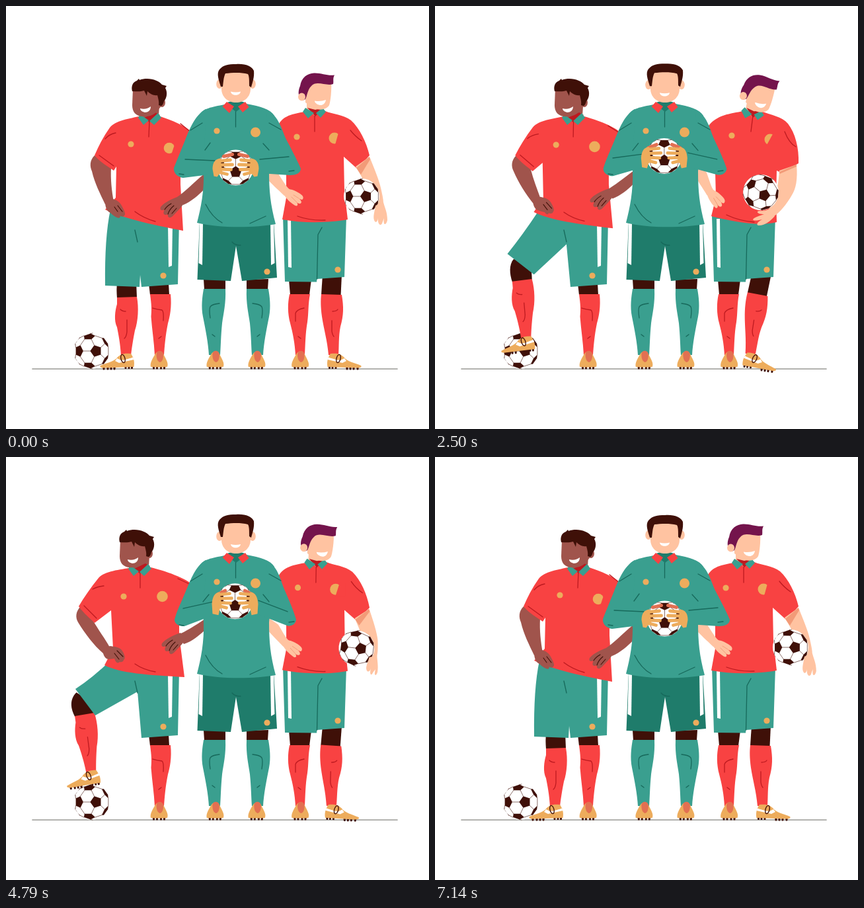
Write an HTML page with a canvas that moves like this. It is 640 by 640 pixels and loops after 7.21 s.

```html
<!DOCTYPE html>
<html lang="en">
<head>
<meta charset="utf-8">
<title>Three football players</title>
<style>
html, body { margin: 0; width: 100%; height: 100%; overflow: hidden; background: #fff; }
canvas { display: block; width: 640px; height: 640px; }
</style>
</head>
<body>
<canvas id="stage" width="640" height="640"></canvas>
<script>
const ctx = document.getElementById('stage').getContext('2d');
const PERIOD = 3605;
const RED = '#f84242', WINE = '#bd1a20', TEAL = '#3a9f8f', PINE = '#1f7c6b', MOSS = '#17695b';
const DARK = '#3f1008', GOLD = '#edac5c', CORAL = '#e27052', WHITE = '#fff';
const SKIN = '#ffc3a1', SHADE = '#f29b78', BROWN = '#a0544c', PLUM = '#74144c';

// drawing helpers
const mix = (a, b, u) => {
  const to = b.match(/-?[\d.]+/g);
  let i = 0;
  return a.replace(/-?[\d.]+/g, v => (+v + (to[i++] - v) * u).toFixed(2));
};
const fill = (d, color) => { ctx.fillStyle = color; ctx.fill(new Path2D(d)); };
const line = (d, color, w = 1.3) => {
  ctx.strokeStyle = color;
  ctx.lineWidth = w;
  ctx.stroke(new Path2D(d));
};
const oval = (x, y, rx, ry, color) => {
  ctx.fillStyle = color;
  ctx.beginPath();
  ctx.ellipse(x, y, rx, ry, 0, 0, 7);
  ctx.fill();
};
const dot = (x, y, r, color) => oval(x, y, r, r, color);
const group = (x, y, turn, draw) => {
  ctx.save();
  ctx.translate(x, y);
  ctx.rotate(turn);
  draw();
  ctx.restore();
};
const flip = (axis, draw) => {
  ctx.save();
  ctx.translate(axis * 2, 0);
  ctx.scale(-1, 1);
  draw();
  ctx.restore();
};
const both = (axis, draw) => { draw(); flip(axis, draw); };

// motion helpers
const ramp = (p, a, b) => {
  const x = Math.min(1, Math.max(0, (p - a) / (b - a)));
  return x * x * x * (10 - 15 * x + 6 * x * x);
};
const KNOTS = [0, 0.2, 0.5, 1];
const curve = (u, ...v) => v.reduce((sum, y, i) =>
  sum + KNOTS.reduce((m, k, j) => j === i ? m : m * (u - k) / (KNOTS[i] - k), y), 0);

// football: projected truncated icosahedron, front pentagon tilted to the right
const tips = [[0, 0, 1], [0, 0, -1]];
for (let i = 0; i < 5; i++) {
  for (const s of [1, -1]) {
    const a = Math.PI + i * Math.PI * 0.4 + (s < 0 ? Math.PI / 5 : 0), r = 2 / Math.sqrt(5);
    tips.push([r * Math.cos(a), r * Math.sin(a), s / Math.sqrt(5)]);
  }
}
const tilt = 0.27;
const hub = tips.map(([x, y, z]) => [
  x * Math.cos(tilt) + z * Math.sin(tilt), y, z * Math.cos(tilt) - x * Math.sin(tilt)]);
const along = (a, b, k) => {
  const v = a.map((c, i) => c + (b[i] - c) * k), n = Math.hypot(...v);
  return v.map(c => c / n);
};
const less = (a, b) => a.map((c, i) => c - b[i]);
const dotp = (p, q) => p[0] * q[0] + p[1] * q[1] + p[2] * q[2];
const cross = (p, q) => [p[1] * q[2] - p[2] * q[1], p[2] * q[0] - p[0] * q[2], p[0] * q[1] - p[1] * q[0]];
const near = v => hub.filter(w => w !== v && Math.hypot(...less(w, v)) < 1.2);
const patches = hub.filter(v => v[2] > -0.3).map(v => {
  const far = near(v);
  const side = cross(v, far[0]), ahead = cross(side, v);
  const angle = w => Math.atan2(dotp(w, side), dotp(w, ahead));
  return far.sort((p, q) => angle(p) - angle(q)).map(w => along(v, w, 1 / 3));
});
const seams = [];
hub.forEach((v, i) => near(v).forEach(w => {
  if (hub.indexOf(w) > i) seams.push([along(v, w, 1 / 3), along(v, w, 2 / 3)]);
}));
const onRim = ([x, y, z], r) => {
  const k = z < 0 ? r / Math.hypot(x, y) : r;
  return (x * k).toFixed(2) + ' ' + (y * k).toFixed(2);
};
const ball = (x, y, turn) => group(x, y, turn, () => {
  const r = 27;
  dot(0, 0, r, WHITE);
  for (const p of patches) {
    if (p.some(c => c[2] > 0.03)) fill('M' + p.map(c => onRim(c, r)).join('L') + 'Z', DARK);
  }
  for (const [a, b] of seams) {
    if (a[2] > 0 || b[2] > 0) line(`M${onRim(a, r)}L${onRim(b, r)}`, DARK, 0.6);
  }
});

// shared parts
const studs = (xs, y) => xs.forEach(x => fill(`M${x - 1.8} ${y}h3.6l-.6 4h-2.4Z`, DARK));
const frontShoe = x => group(x, 0, 0, () => {
  studs([-8, -3, 3, 8], 545.5);
  fill('M-6 527C-10 534 -14 540 -12.500 546Q0 547 12.500 546C15 540 10 534 7 527C4 521 -3 521 -6 527Z', GOLD);
  fill('M-4 527C-4 520 6 520 6.500 527C7 535 4 539 1 539C-3 537 -4 532 -4 527Z', CORAL);
});
const sideShoe = () => {
  studs([148, 154, 159, 164], 546.5);
  studs([181, 186, 190.5], 545);
  fill('M173 528C178 525 186 526 189 526C193 532 195 538 193.500 546L150 547.500C144 548 141 546 143 544C152 540 164 538 169 531Z', GOLD);
  fill('M165 537L171 540L193.500 535L192 531.500L174 536L168 533Z', WHITE);
  fill('M178 531L190 529L191 532L177 536Z', GOLD);
  ctx.beginPath();
  ctx.ellipse(177, 533.5, 3, 6.3, -0.25, 0, 7);
  ctx.strokeStyle = DARK;
  ctx.lineWidth = 1.3;
  ctx.stroke();
};
const mark = (x, y) => dot(x, y, 4.6, GOLD);

function leftPlayer(u) {
  const key = (...v) => curve(u, ...v);
  const m = (a, b) => mix(a, b, u);

  // standing leg
  fill('M216 420L246 420L247 437L218 437Z', DARK);
  fill('M218 436L249 436C251 455 248 470 245 480C241 500 240 515 239 528L225 528C224 508 221 490 219.500 470C221 455 219 445 218 436Z', RED);
  line('M222 457Q229 459 236 460Q239 462 238 476M231 503L235 500', WINE);
  frontShoe(231.5);

  // moving leg
  group(key(183, 162, 134, 119), key(441, 440, 418, 390), key(0, -0.02, -0.08, -0.13), () => {
    fill(m('M-15 1C-16 -12 -16 -24 -12 -32L14 -24L15 0Z', 'M-15 1C-20 -12 -20 -26 -8 -35L17 -14L15 0Z'), DARK);
    fill('M-15 0L15 -1C18 15 17 35 12 50C9 65 7 78 6 88L-9 88C-10 70 -13 55 -15 45C-20 35 -18 20 -15 10Z', RED);
    line('M-10 18Q-7 21 -2 21M0 34L0 52Q-1 60 -4 62', WINE);
    ctx.translate(-183, -441);
    sideShoe();
  });

  // shorts
  const hip = `${key(149, 146, 133, 131)} ${key(350, 350, 348, 334)}`;
  const outer = `${key(150, 132, 111, 105)} ${key(423, 410, 378, 351)}`;
  const inner = `${key(202, 181, 152, 135)} ${key(425, 423, 408, 391)}`;
  const fork = `${key(203, 201, 199, 199)} ${key(407, 378, 361, 355)}`;
  fill(`M158 308Q${hip} ${outer}L${inner}L${fork}L205 425L260 421L262 322Z`, TEAL);
  fill('M245 330L252 330L251 393L246 395Z', WHITE);
  line('M195 339L199 357', MOSS);
  mark(238, 408);

  // far arm, shirt
  fill(m('M134 226C126 234 127 243 130 250C134 268 143 285 150 300L163 296C160 280 158 262 159 245Z',
    'M113 226C105 234 105 243 109 250C120 268 133 285 147 297L157 288C150 275 140 262 132 248Z'), BROWN);
  fill(m('M205 166C185 171 166 173 157 184C147 198 140 212 134 226C143 237 155 243 163 249L167 243L166 290L150 308C175 320 215 330 268 340L264 270L264 240L285 195C272 180 250 173 233 167Z',
    'M190 167C172 171 150 172 140 183C128 198 118 212 110 226C118 237 127 244 134 251L159 232L162 290L149 315C172 327 215 330 270 333L262 270L262 240L285 195C272 183 240 172 219 167Z'), RED);
  line(m('M150 201Q156 194 166 192M141 226L163 242M264 178L280 191M217 174L216 198M195 311Q208 321 226 326',
    'M131 200Q138 196 148 195M118 225L137 244M260 184L277 192M203 173L203 198M195 313Q208 322 226 325'), WINE);
  mark(189 - 11 * u, 209 + 2 * u);
  dot(247 - 10.5 * u, 215 - 4 * u, 8.3, GOLD);
  fill(m('M256 207L250 225L262 225L262 207Z', 'M250 207L250 225L262 225L262 207Z'), RED);

  // hands
  fill(m('M150 296C150 305 153 311 158 313C161 316 165 319 168 320C172 322 174 319 172 317C175 319 178 319 179 317C182 315 178 308 175 302C172 296 166 293 162 292Z',
    'M146 292C147 300 150 306 156 306C159 306 162 305 164 305C166 311 169 313 172 310C175 311 178 309 178 307C182 304 178 296 175 292C170 287 164 287 157 286Z'), BROWN);
  line(m('M164 304L169 311M169 302L176 311', 'M164 297L171 306M168 293L177 302'), DARK, 1.1);
  fill(m('M300 254C285 266 272 280 259 289L268 301C280 296 292 286 300 277Z',
    'M301 245C285 256 272 264 260 269L269 283C282 279 292 270 301 262Z'), BROWN);
  group(2 * u, -22 * u, 0, () => {
    fill('M262 288C250 292 240 297 234 304C232 309 236 310 240 308C237 313 238 318 245 315C244 320 248 322 252 318C258 312 266 304 270 297Z', BROWN);
    line('M250 299Q243 303 240 308M254 302Q247 308 245 315M258 306L251 314', DARK, 1.1);
  });

  // neck, collar and head
  group(-15 * u, 0, 0, () => {
    fill('M209 156L232 150L231 166L217 175L208 168Z', BROWN);
    fill('M209 169L226 161L233 165L217 176Z', WINE);
    fill('M203 164L200 169L208 180L216 173ZM217 174L224 180L235 169L230 162Z', TEAL);
  });
  group(-19 * u, 0, 0, () => {
    fill('M192 125L191 150C191 160 196 166 205 167C215 168 222 166 228 160L236 150L234 124Z', BROWN);
    oval(236, 146, 5, 7, BROWN);
    fill('M191 129C189 121 192 115 198 113L201 110L202 112C215 107 231 112 236 119L243 121L241 124C245 131 243 140 239 144C238 148 236 152 234 151L231 150C232 145 230 139 229 135C224 136 218 133 214 129L213 136L209 128C203 130 196 129 191 129Z', DARK);
    fill('M203 155C209 157 215 155 219 152C219 158 215 161 210 161C206 160 203 158 203 155Z', WHITE);
  });
}

function keeper(u) {
  const m = (a, b) => mix(a, b, u);

  // legs
  both(348, () => {
    fill('M299 413L332 414L332 429L300 429Z', DARK);
    fill('M299 428L332 428C333 450 329 465 327 480C325 500 325 515 324 528L307 528C306 510 302 490 298 470C295 455 297 440 299 428Z', TEAL);
    line('M309 472Q307 459 309 455Q312 451 323 450M312 497L316 500', MOSS);
  });
  frontShoe(316.3);
  frontShoe(379.3);
  fill('M293 325L289.500 414L340 416L348 363L357 416L410 411L405 325Z', PINE);
  both(349, () => fill('M293 328L298 328L297 392L291.500 389Z', WHITE));
  line('M342 357Q346 362 355 362', MOSS);
  mark(395, 402);

  // torso and sleeves
  fill('M331 149C310 153 299 155 293 164L299 250C300 280 295 305 289 328C320 336 375 336 408 330C400 300 398 280 398 250L406 166C400 156 385 152 364 148Z', TEAL);
  fill(m('M302 156C285 166 277 188 271 203C265 218 259 232 254 245C253 253 260 259 268 260L316 254L316 232L299 230L302 180Z',
    'M302 156C286 166 280 185 272 203C265 220 258 234 255 246C255 253 262 256 270 256L315 239L313 216L299 222L302 180Z'), TEAL);
  fill(m('M393 156C411 164 417 185 423 200C431 215 440 232 446 246C446 253 438 256 430 256L384 253L384 231L398 229L396 180Z',
    'M393 156C411 164 415 185 421 200C428 216 435 232 439 246C438 253 432 257 425 255L381 238L382 216L398 222L396 180Z'), TEAL);
  line(m('M271 232L316 234M384 232L428 228M301 218L309 207M389 208L398 218',
    'M268 229L313 219M382 217L426 234M298 219L307 208M389 208L398 219'), MOSS);
  line('M279 188L297 177M398 177L416 187M262 254L269 255M428 250L436 249M347.500 156V183M302 300Q312 320 327 328M369 329L393 318', MOSS);
  mark(319, 189);
  dot(377.5, 191, 7.5, GOLD);

  // collar and head
  fill('M332 148C338 142 358 142 364 148L348 160Z', PINE);
  fill('M334 145L327.500 152L338 162L345 152ZM362 145L367.500 153L358 161L351 152Z', RED);
  both(348, () => oval(323, 118 + 2 * u, 4.8, 7, SKIN));
  fill('M327 98L326 125C326 138 336 146 348 146C360 146 370 138 370 125L370 98Z', SKIN);
  group(0, -u, 0, () =>
    fill('M325 122C322 112 318 102 323 96C329 89 336 88 348 88C362 87 372 91 375 98C376 108 373 115 371 123L368 121C368 112 368 106 366 103C355 100 342 101 332 102C329 108 329 115 328 122Z', DARK));
  group(0, 2.5 * u, 0, () => fill('M340 129.500Q347.500 131.500 355 129.500C354 136.500 341 136.500 340 129.500Z', WHITE));

  // ball and gloves
  const x = 347.5 - u, y = 244.5 - 26.5 * u;
  ball(x, y, Math.PI / 2);
  group(x, y, 0, () => both(0, () => {
    line(m('M-18 -17L-5 -20', 'M-27 -10L-15 -16'), CORAL, 5);
    fill(m('M-35 2C-35 -8 -31 -13 -23 -14L-20 8L-25 10L-28 14L-33 13Z',
      'M-35 4C-34 -7 -31 -13 -23 -14L-20 8L-23 12L-25 21L-34 19Z'), GOLD);
    line('M-24 -10L-8 -11.500M-23 -4L-5 -4.500M-23 2.500L-7 3M-23 7.500L-13 10', GOLD, 4.8);
  }));
}

function rightPlayer(u) {
  const m = (a, b) => mix(a, b, u);

  // legs
  fill('M428 414L462 414L459 437L430 437Z', DARK);
  fill('M429 436L460 436C457 450 458 465 456 478C453 495 453 510 452 528L438 528C437 510 434 495 430 480C426 465 426 450 429 436Z', RED);
  line('M438 477L438 465Q440 459 451 457M442 500L446 503', WINE);
  frontShoe(445);
  group(493 - u, 415, 0.155 * u, () => {
    ctx.translate(-493, -415);
    fill('M479 406L508 406L506.500 438L477 437Z', DARK);
    fill('M477 436L508 437C511 455 511 468 506 485C503 500 504 515 503 528L488 528C486 505 481 490 478 470C476 455 476 445 477 436Z', RED);
    line('M502 459Q500 462 494 462M493 476L493 492Q494 498 496 500', WINE);
    flip(340, sideShoe);
  });
  fill('M419 318L422 417L470 417.500L470.500 413L512 410L515 318Z', TEAL);
  fill('M426 322L431 322L432 396L427 395Z', WHITE);
  line('M478 335L472 346L470.500 413', MOSS);
  mark(502, 399);

  // shirt
  fill(m('M456 159C438 163 420 164 412 180L424 250L424 290L418 323C450 329 490 328 517 323L512 280L511 228L530 245C538 240 545 232 550 226C545 205 535 185 522 173C510 164 495 164 483 159Z',
    'M466 159C448 163 425 164 412 184L424 250L425 290L418 318C450 326 490 334 517 327L516 290L517 249L521 251C532 248 542 243 550 238C551 215 545 192 534 178C525 167 508 165 493 159Z'), RED);
  line(m('M467 163L467 190M521 188Q528 197 538 204M441 318Q460 325 483 324',
    'M481 166L478 190M529 190Q536 208 546 213M441 316Q460 325 483 327'), WINE);
  mark(440 + 9 * u, 198 - 2 * u);
  dot(497 + 10 * u, 200 + 2 * u, 8.5, GOLD);
  fill(m('M503.500 190L498 210L512 210L512 190Z', 'M512 192L501 212L519 212L519 192Z'), RED);

  // near arm
  group(420 - 9 * u, 285 - u, 0.25 * u, () => {
    ctx.translate(-420, -285);
    fill('M390 240L412 254C419 264 424 274 430 278L421 287C412 278 402 270 390 256Z', SKIN);
    fill('M419 283C424 292 430 297 436 301C440 304 443 302 440 297C442 299 444 299 445 299C449 298 446 293 443 291C446 293 449 294 449.500 291C451 287 444 283 438 280C432 277 428 277 424 277Z', SKIN);
    line('M432 289L440 297M435 286L443 291', SHADE, 0.9);
  });

  // ball arm
  fill(m('M529 243L550 228C558 248 564 262 567 275C569 284 571 292 571 298L559 304C552 280 540 262 529 243Z',
    'M521 249L547 240C549 262 546 277 540 286C532 300 522 312 513 318L503 309C512 302 519 280 521 249Z'), SKIN);
  fill(m('M530 245L549.500 228L551 232L537 255Z', 'M521 251L547 239.500L547 243L521.500 254Z'), SHADE);
  ball(538 - 45 * u, 288 - 6 * u + 16 * u * (1 - u), 0.7 * u);
  fill(m('M559 302C558 310 555 318 557 324C559 329 562 327 563 321C562 329 566 334 569 329C570 326 571 323 572 321C570 332 575 333 577 324C577 312 573 305 571 297Z',
    'M503 308C498 311 490 309 488 311C487 314 493 315 498 315C490 318 482 320 481 323C482 326 490 324 495 323C487 327 486 331 489 332C497 333 506 327 514 318Z'), SKIN);

  // neck, collar and head
  group(467 + 14 * u, 160 + 2 * u, 0.2 * u, () => {
    ctx.translate(-467, -160);
    fill('M455 138L455 156L467 166L480 154Z', SKIN);
    fill('M456 154L468 157L480 154L468 167Z', WINE);
    fill('M453 154L449 160L457 170L466 162ZM479 154L484 160L476 169L469 162Z', TEAL);
    fill('M453 118L492 111C493 128 491 144 489 150C484 158 472 158 465 154L453 146Z', SKIN);
    fill('M449 143C442 139 441 130 445 121C447 108 456 102 466 101.500C477 101 486 106 497 104.500C494 110 496 113 495 118C485 122 470 112 462 121C456 127 456 135 453 141Z', PLUM);
    oval(447.500, 137.500, 5.500, 6, SKIN);
    fill('M467 143.500Q476 145 484 142C483 148 479 150.500 475 150C470 149 467 146 467 143.500Z', WHITE);
  });
}

function render(now) {
  const p = now % PERIOD;
  ctx.lineCap = ctx.lineJoin = 'round';
  ctx.fillStyle = WHITE;
  ctx.fillRect(0, 0, 640, 640);
  line('M40 549.100H592', '#a8a8a4', 1.7);
  ball(129.5, 522, 0);
  rightPlayer(ramp(p, 900, 1840) - ramp(p, 2680, 3590));
  leftPlayer(ramp(p, 0, 1050) - ramp(p, 1980, 3055));
  keeper(ramp(p, 100, 1300) - ramp(p, 2139, 3020));
}

const start = performance.now();
const tick = () => {
  render(performance.now() - start);
  requestAnimationFrame(tick);
};
tick();
</script>
</body>
</html>
```
